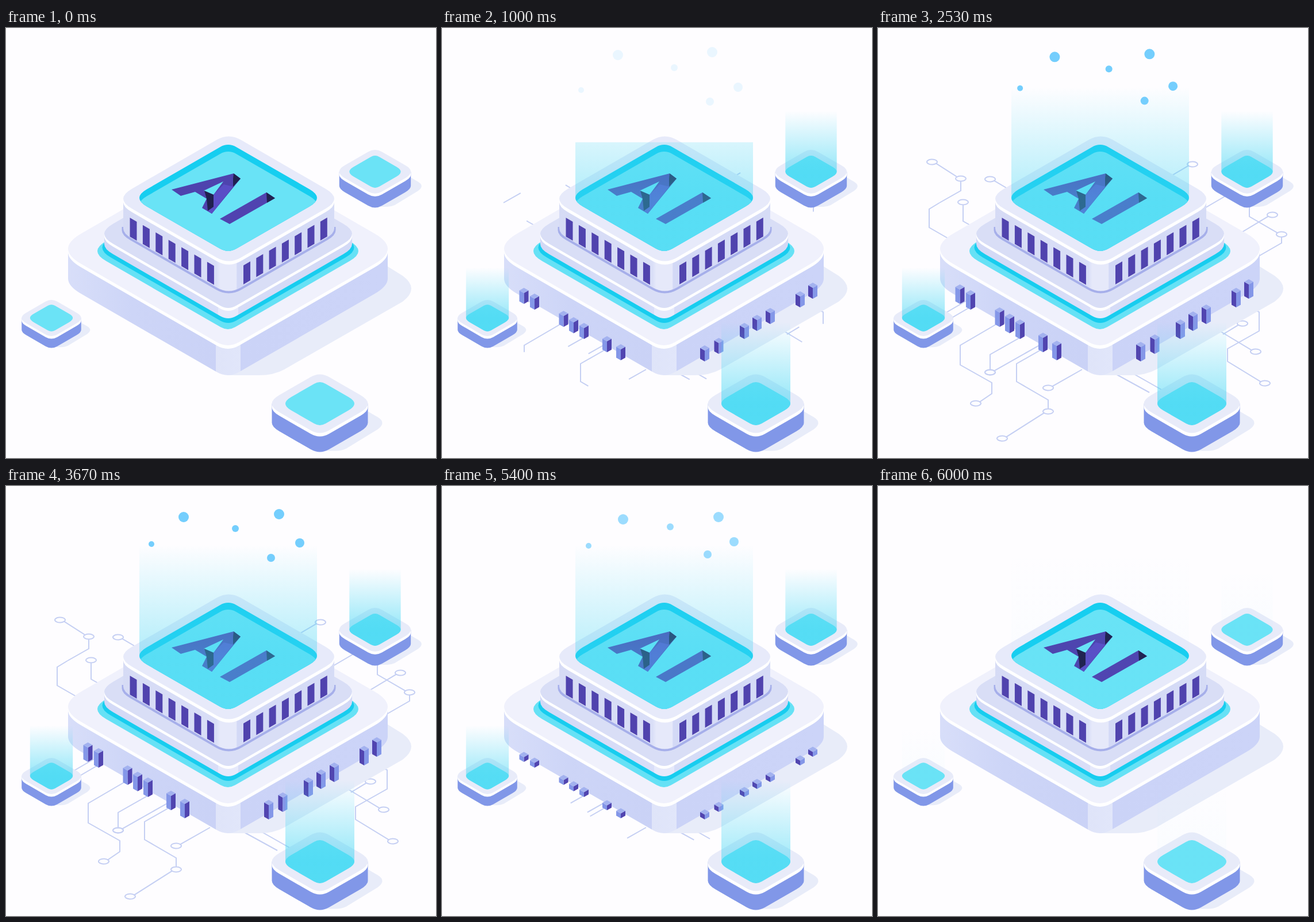
These frames come from a looping animation (748x748 px, 6.07 s). An HTML page:

```html
<!DOCTYPE html>
<html lang="en">
<head>
<meta charset="utf-8">
<title>AI chip</title>
<style>
  html, body { margin: 0; height: 100%; overflow: hidden; background: #fefdff; }
  svg { display: block; width: 100vw; height: 100vh; }
</style>
</head>
<body>
<svg id="stage" viewBox="0 0 748 748">
  <defs>
    <linearGradient id="baseSide">
      <stop stop-color="#d8def9"/><stop offset=".2" stop-color="#cdd5f7"/><stop offset=".463" stop-color="#cad2f6"/>
      <stop offset=".463" stop-color="#dfe4f9"/><stop offset=".54" stop-color="#e1e6fa"/>
      <stop offset=".54" stop-color="#cbd3f7"/><stop offset="1" stop-color="#ccd4f8"/>
    </linearGradient>
    <linearGradient id="tierSide">
      <stop stop-color="#d3d9f6"/><stop offset=".46" stop-color="#d9def8"/>
      <stop offset=".46" stop-color="#e6e9fb"/><stop offset=".54" stop-color="#e6e9fb"/>
      <stop offset=".54" stop-color="#d6dcf7"/><stop offset="1" stop-color="#d3d9f6"/>
    </linearGradient>
    <linearGradient id="moduleSide">
      <stop stop-color="#d6dbf5"/><stop offset=".44" stop-color="#d9def7"/>
      <stop offset=".46" stop-color="#e6e9fa"/><stop offset=".535" stop-color="#e6e9fa"/>
      <stop offset=".54" stop-color="#d3d9f6"/><stop offset="1" stop-color="#d6dcf6"/>
    </linearGradient>
  </defs>
</svg>
<script>
const LOOP = 6070, SLOPE = 0.577;
const stage = document.getElementById('stage');
const ramp = (t, a, b) => Math.min(1, Math.max(0, (t - a) / (b - a)));

function add(tag, attrs, parent = stage) {
  const node = document.createElementNS('http://www.w3.org/2000/svg', tag);
  for (const key in attrs) node.setAttribute(key, attrs[key]);
  return parent.appendChild(node);
}
const fill = (d, color) => add('path', { d, fill: color });

// Half of a rounded isometric diamond; m = 1 runs left to right below, -1 back above.
function half(x, y, w, h, c, m = 1) {
  const e = SLOPE * (w + c) - h, dx = 2 * e / SLOPE;
  const p = (a, b) => `${x + m * a} ${y + m * b} `;
  return 'Q' + p(-w, c * SLOPE) + p(c - w, 2 * c * SLOPE) + 'L' + p(-dx, h - e) +
    'Q' + p(0, h + e) + p(dx, h - e) + 'L' + p(w - c, 2 * c * SLOPE) +
    'Q' + p(w, c * SLOPE) + p(w, 0);
}
const diamond = (x, y, w, h, c) =>
  `M${x - w} ${y}` + half(x, y, w, h, c) + half(x, y, w, h, c, -1) + 'Z';
const wall = (x, top, y, w, h, c) =>
  `M${x - w} ${top}V${y}` + half(x, y, w, h, c) + `V${top}Z`;

function slab(x, y, w, h, c, depth, rim, side, face) {
  fill(wall(x, y, y + depth, w, h, c), side);
  fill(wall(x, y, y + rim, w, h, c), '#fff');
  fill(diamond(x, y, w, h, c), face);
}

// Circuit traces, each one continuous stroke drawn and erased in its own time window.
// A ring is entered at offset (dx, dy) from its centre.
const ring = (x, y, dx, dy) =>
  `L${x + dx} ${y + dy}a9 4.5 0 1 1 ${-2 * dx} ${-2 * dy}a9 4.5 0 1 1 ${2 * dx} ${2 * dy}`;
const traces = [];
function trace(d, in0 = 750, in1 = 1500, out0 = 4750, out1 = 5370) {
  const node = add('path', { d, pathLength: 1, fill: 'none', stroke: '#c5cff3', 'stroke-width': 2 });
  traces.push({ node, in0, in1, out0, out1 });
}
trace('M122 366L89 347V315L107 304', 1400, 1700);
trace('M107 304L144 283' + ring(144, 262, 0, 4.5));
trace('M136.8 258.5' + ring(94, 233, 7.2, 2.7), 1515, 1800, 4600, 4780);
trace('M240 288' + ring(195, 263, 7.2, 2.7));
trace('M178 353L148 336' + ring(148, 303, 0, 4.5));
trace('M490 269' + ring(547, 237, -7.2, 2.7));
trace('M550 324L610 289');
trace('M646 305V328' + ring(702, 359, -7.2, -2.7), 900, 1750);
trace('M620 363' + ring(686, 325, -7.2, 2.7), 1000, 1800);
trace('M655 401L702 374V364', 900, 1650);
trace('M170 465L110 500');
trace('M180 474L120 509');
trace('M208 514L143 552V586L198 617V636' + ring(170, 653, 7.2, -2.7));
trace('M262 530L195 568' + ring(195, 599, 0, -4.5), 750, 1500, 4750, 5680);
trace('M300 541' + ring(195, 599, 7.2, -2.7), 750, 1500, 4750, 5750);
trace('M290 556L241 584V615L296 647' + ring(296, 667, 0, -4.5) +
  'A9 4.5 0 0 0 288.8 669.7' + ring(216, 714, 7.2, -2.7), 750, 1590, 4750, 5480);
trace('M355 594' + ring(296, 626, 7.2, -2.7), 750, 1500, 4750, 5780);
trace('M410 600L472 634', 750, 1500, 4750, 5950);
trace('M440 599L500 633', 750, 1500, 4750, 5900);
trace('M600 533' + ring(634, 514, -7.2, 2.7));
trace('M596 528' + ring(657, 563, -7.2, -2.7));
trace('M655 490L663 494V527L608 558V580' + ring(673, 618, -7.2, -2.7), 900, 1710, 4700, 5350);

// Base, tier and module
fill('M386 604H440Q466 604 484 594L690 476Q720 453 690 431L640 400Z', '#e8ecf9');
slab(386, 384, 278, 168, 23, 52, 6, 'url(#baseSide)', '#f0f1fc');
fill(diamond(386, 388, 227, 136, 15), '#66e1f5');
fill(diamond(386.5, 382, 219, 131, 15), '#17cdef');
slab(386.5, 358, 215.5, 129, 15, 18, 5, 'url(#tierSide)', '#d9def6');
fill(wall(387.5, 346, 352, 186, 109.5, 15), '#a6afea');
slab(387.5, 297, 183.5, 108.5, 15, 52, 6, 'url(#moduleSide)', '#e7eafa');

const slot = (x, y, s) => `M${x} ${y}l12 ${7 * s}v33l-12 ${-7 * s}z`;
let slots = '';
for (let i = 0; i < 7; i++) {
  slots += slot(215.5 + 22.4 * i, 330 + 12.8 * i, 1) + slot(413 + 22.3 * i, 413 - 12.7 * i, -1);
}
fill(slots, '#5043ae');

const recess = diamond(386.5, 295.5, 154.5, 92.5, 13);
add('path', { d: recess }, add('clipPath', { id: 'recess' }));
fill(recess, '#16cef0');
fill(diamond(386.5, 307.5, 154.5, 92.5, 13), '#69e3f6').setAttribute('clip-path', 'url(#recess)');

// Sunken letters
add('path', {
  d: 'M288 281L396 253L408 262L358 323L341 313L349 297L329 285L304 292Z' +
     'M344 283L378 267L361 290Z',
  fill: '#4e43ae', 'fill-rule': 'evenodd'
});
fill('M361 290L379 272L395 276L358 323L351 318L361 311Z', '#5a4dc6');
fill('M396 253L408 262L395 276V262Z', '#20214f');
fill('M345 283L361 290V311L351 318L349 297Z', '#20214f');
fill('M372 332L453 286L468 296L389 341Z', '#5043b0');
fill('M453 286L468 296L454 304Z', '#20214f');

// Pins: the two rows mirror each other, the dark face towards the front corner
const pins = [
  [142.5, 480], [161, 490], [211.5, 520], [229, 531], [247, 541], [287, 564], [311, 578],
  [457, 580], [481.5, 567], [526, 541], [548, 527], [571, 515], [623, 486], [645, 471]
];
const pinFaces = ['#5145b0', '#8497e8', '#a3b2ef'].map(color => fill('', color));
function drawPins(p) {
  const h = 25 * p;
  const side = (x, y, dx) => `M${x} ${y}l${dx} -4.5v${-h}l${-dx} 4.5z`;
  const faces = [
    (x, y) => side(x, y, x < 386 ? 8 : -8),
    (x, y) => side(x, y, x < 386 ? -8 : 8),
    (x, y) => `M${x} ${y - h}l-8 -4.5l8 -4.5l8 4.5z`
  ];
  pinFaces.forEach((node, i) => {
    node.setAttribute('d', pins.map(pin => faces[i](...pin)).join(''));
    node.setAttribute('opacity', Math.min(1, p * 6));
  });
}

// Light beams
const beams = [];
function beam(x, y, w, h, c, height, alpha, in0, in1) {
  const id = 'beam' + beams.length;
  const gradient = add('linearGradient',
    { id, gradientUnits: 'userSpaceOnUse', x1: 0, x2: 0, y1: y - height, y2: y });
  add('stop', { 'stop-color': '#3fd6f3', 'stop-opacity': 0 }, gradient);
  add('stop', { offset: 1, 'stop-color': '#3fd6f3', 'stop-opacity': alpha }, gradient);
  const node = fill('', `url(#${id})`);
  beams.push((t, opacity) => {
    const p = ramp(t, in0, in1);
    node.setAttribute('d', p ? wall(x, y - height * p, y, w, h, c) : '');
    node.setAttribute('opacity', opacity);
  });
}
beam(386.5, 295.5, 154.5, 92.5, 13, 193, .4, 650, 1350);

// Small chips
function chip(x, y, s, start) {
  add('path', {
    d: 'M0 82H28Q38 82 46 78L100 45Q117 33 100 23L60 0Z',
    transform: `translate(${x} ${y}) scale(${s})`, fill: '#e8ecf9'
  });
  slab(x, y, 83.5 * s, 51 * s, 13 * s, 33 * s, 2 + 4 * s, '#8197e8', '#e8ebf9');
  const pad = [x, y, 60 * s, 37.5 * s, 10 * s];
  fill(diamond(...pad), '#6be3f6');
  beam(...pad, 142 * s, .55, start, start + 640);
}
chip(642, 250, .745, 20);
chip(79, 504.5, .62, 165);
chip(546, 653.5, 1, 130);

// Floating dots: radius, then waypoints
const dotTimes = [1530, 3670, 4730, 5400];
const dots = [
  [9, [306, 47], [309, 54], [311, 61], [315, 58]],
  [9, [470, 42], [475, 49], [475, 53], [481, 54]],
  [6, [404, 69], [399, 74], [394, 78], [397, 71]],
  [8, [515, 103], [511, 99], [507, 95], [508, 97]],
  [7, [466, 128], [461, 125], [449, 124], [462, 119]],
  [5, [242, 108], [253, 101], [256, 105], [255, 104]]
].map(([r, ...way]) => ({ way, node: add('circle', { r, fill: '#74cefd' }) }));

function drawDots(t) {
  const i = t < dotTimes[1] ? 0 : t < dotTimes[2] ? 1 : 2;
  const p = ramp(t, dotTimes[i], dotTimes[i + 1]);
  const opacity = ramp(t, 950, 1300) * (1 - ramp(t, 5200, 5900));
  for (const { way, node } of dots) {
    const [x, y] = way[i].map((v, k) => v + (way[i + 1][k] - v) * p);
    node.setAttribute('cx', x);
    node.setAttribute('cy', y);
    node.setAttribute('opacity', opacity);
  }
}

function draw() {
  const t = performance.now() % LOOP;
  for (const { node, in0, in1, out0, out1 } of traces) {
    const p = ramp(t, in0, in1) * (1 - ramp(t, out0, out1));
    node.setAttribute('stroke-dasharray', `${p} 2`);
    node.setAttribute('visibility', p ? 'visible' : 'hidden');
  }
  drawPins(ramp(t, 140, 1270) * (1 - ramp(t, 4650, 5790)));
  const glow = 1 - ramp(t, 5330, 6030);
  beams.forEach(update => update(t, glow));
  drawDots(t);
  requestAnimationFrame(draw);
}
draw();
</script>
</body>
</html>
```
